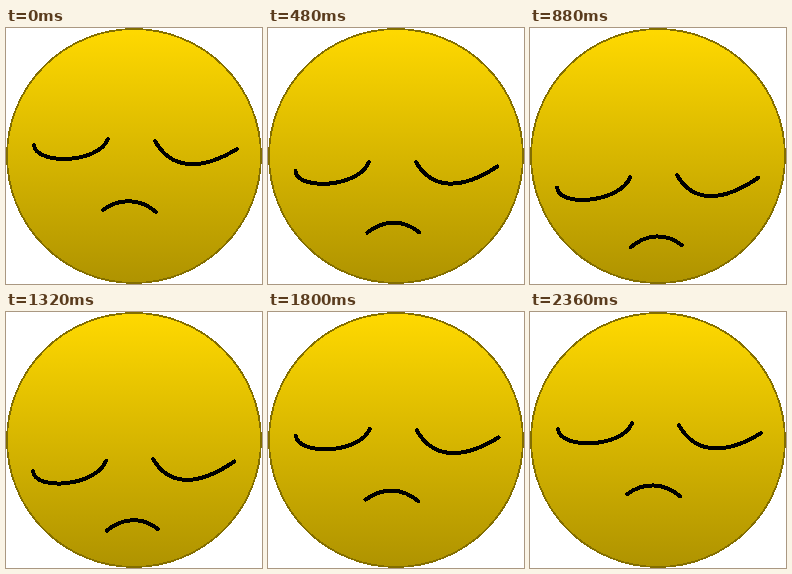
These frames come from a looping animation (256x256 px, 2.48 s). An HTML page:

```html
<!DOCTYPE html>
<html lang="en">
<head>
<meta charset="utf-8">
<title>Sad face</title>
<style>
  html, body { margin: 0; width: 100%; height: 100%; overflow: hidden; background: #fff; }
  svg { display: block; width: 100vw; height: 100vh; }
  path { fill: none; stroke: #000; stroke-width: 4; stroke-linecap: round; }
</style>
</head>
<body>
<svg viewBox="0 0 256 256" shape-rendering="crispEdges">
  <defs>
    <linearGradient id="shade" x1="0" y1="0" x2="0" y2="1">
      <stop offset="0" stop-color="#ffd900"/>
      <stop offset="1" stop-color="#af9300"/>
    </linearGradient>
  </defs>
  <circle cx="128" cy="128" r="127" fill="url(#shade)" stroke="#836e00" stroke-width="1.8"/>
  <path id="leftEye"/>
  <path id="rightEye"/>
  <path id="mouth"/>
</svg>
<script>
const LOOP = 2480, STEP = 40, REST = 0.92;
const FALL_TIME = 920, RISE_START = 1280, RISE_HALF = 360;

// A Bézier curve per feature, and how far its two ends travel when lowered.
const features = {
  leftEye:  { curve: [[28, 117], [30, 137], [92, 136], [102, 111]], travel: [[-1, 46], [-2, 41]] },
  rightEye: { curve: [[149, 113], [163, 138], [190, 146], [231, 121]], travel: [[-2, 37], [-3, 31]] },
  mouth:    { curve: [[97, 182], [113, 170], [134, 170], [150, 184]], travel: [[4, 40], [2, 36]] }
};

const lerp = (a, b, u) => a + (b - a) * u;

function easeInOutBack(u) {
  const s = 2.595, v = 2 * u;
  if (u < 0.5) return v * v * ((s + 1) * v - s) / 2;
  const w = v - 2;
  return (w * w * ((s + 1) * w + s) + 2) / 2;
}

// Falls with a wind-up and overshoot, rests, then rises with a long soft tail.
function lowered(t) {
  if (t < FALL_TIME) return REST * easeInOutBack(t / FALL_TIME);
  const elapsed = Math.max(0, t - RISE_START);
  return REST / (1 + (elapsed / RISE_HALF) ** 4.6);
}

function pathFor({ curve, travel: [from, to] }, amount) {
  const left = curve[0][0], width = curve[3][0] - left;
  const points = curve.map(point => {
    const along = (point[0] - left) / width;
    return point.map((value, axis) => value + amount * lerp(from[axis], to[axis], along));
  });
  return `M${points[0]}C${points.slice(1).join(' ')}`;
}

function render(now) {
  const t = Math.floor((now % LOOP) / STEP) * STEP;
  const amount = lowered(t);
  for (const [id, feature] of Object.entries(features)) {
    document.getElementById(id).setAttribute('d', pathFor(feature, amount));
  }
}

const start = performance.now();
function tick() {
  render(performance.now() - start);
  requestAnimationFrame(tick);
}
tick();
</script>
</body>
</html>
```
